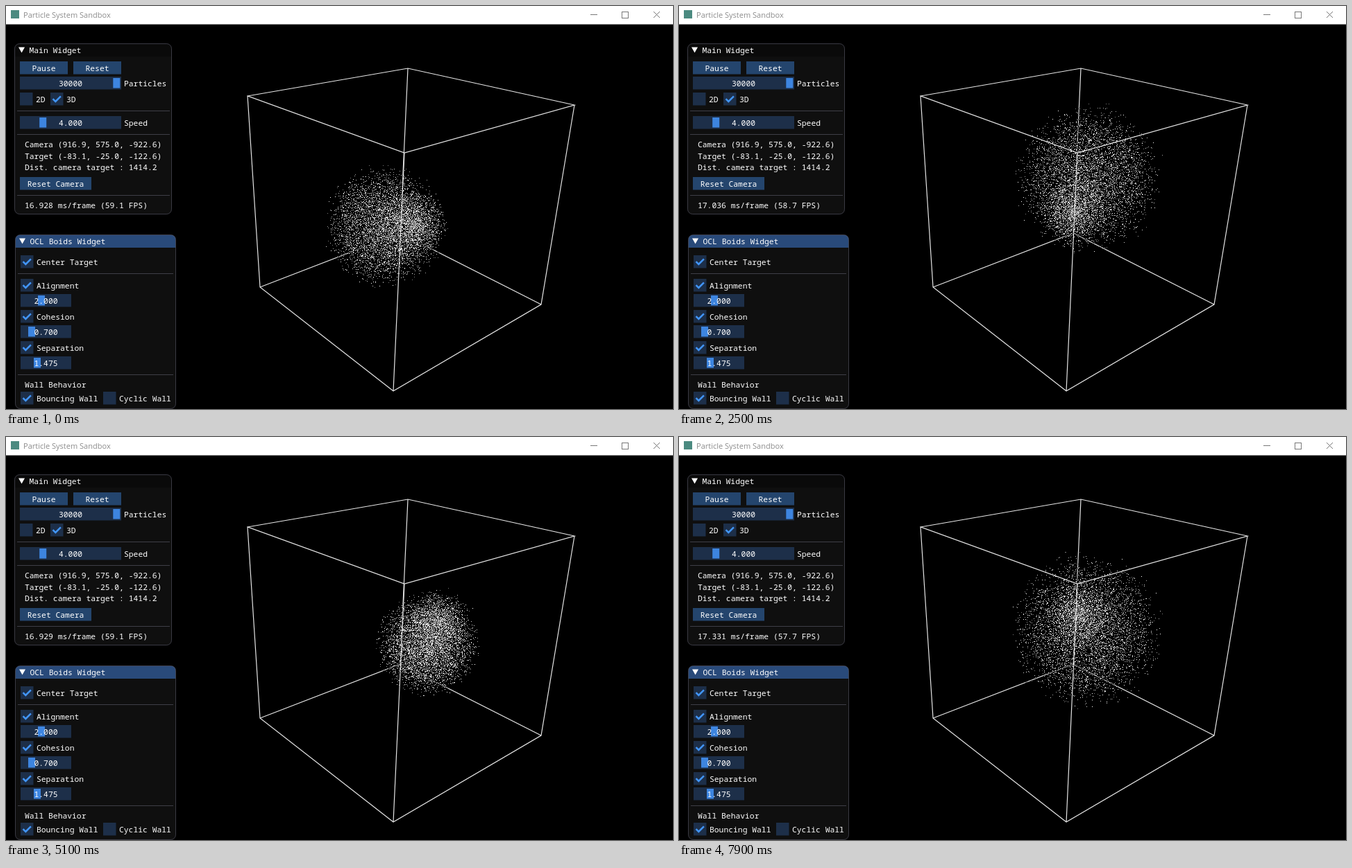
Animation of 961 by 582 pixels, one loop 8000 ms. Source, as an HTML page with a canvas:

```html
<!DOCTYPE html>
<html lang="en">
<head>
<meta charset="utf-8">
<title>Particle System Sandbox</title>
<style>
  html, body { margin: 0; width: 100%; height: 100%; overflow: hidden; background: #000; }
  canvas { display: block; }
</style>
</head>
<body>
<canvas id="stage" width="961" height="582"></canvas>
<script>
const ctx = document.getElementById('stage').getContext('2d');
const LOOP = 8000, STEP = 100, COUNT = 7500, CORE_SIZE = 54;
const MONO = '11.35px "Noto Sans Mono", monospace';
const BUTTON = '#24456d', FRAME = '#1d2f49', GRAB = '#3d85e0', CHECK = '#4296fa';
const EDGE = 'rgba(110,110,128,0.5)', WIRE = '#e6e6e6';
const ROW = 18.5; // height of every control

// turning points of the swarm: seconds, centre, radius
const SWARM = [
  [0, 545, 318, 92], [0.9, 545, 375, 97], [1.8, 575, 272, 84],
  [3, 597, 235, 130], [4.25, 637, 346, 95], [5.2, 606, 298, 78],
  [6.6, 588, 266, 75], [7.5, 600, 277, 140], [8, 585, 279, 116]
];

// turning points of the dense core: seconds, centre
const CORE = [
  [0, 588, 314], [1.5, 555, 300], [3.2, 577, 293], [4.2, 545, 320],
  [5.1, 624, 268], [6.6, 593, 268], [8, 576, 255]
];

// seconds, milliseconds per frame
const LOAD = [
  [0, 16.928], [1.5, 16.962], [3.2, 17.078], [4.2, 16.695],
  [5.1, 16.929], [6.7, 17.849], [7.9, 17.331]
];

// value between two turning points, slowing down at each
function glide(points, t) {
  let i = 0;
  while (i < points.length - 2 && t > points[i + 1][0]) i++;
  const [from, ...a] = points[i], [to, ...b] = points[i + 1];
  const k = (1 - Math.cos(Math.PI * Math.min(1, (t - from) / (to - from)))) / 2;
  return a.map((v, j) => v + (b[j] - v) * k);
}

let seed = 20177;
function rand() {
  seed = (seed * 1664525 + 1013904223) % 4294967296;
  return seed / 4294967296;
}

const boids = Array.from({ length: COUNT }, () => {
  const y = rand() * 2 - 1, turn = rand() * Math.PI * 2, core = rand() < 0.23;
  const r = rand() ** (core ? 0.65 : 0.42) * (0.7 + 0.3 * rand());
  return { y: y * r, ring: Math.sqrt(1 - y * y) * r, turn, spin: 1.2 + rand(), core };
});

function place(t) {
  const swarm = glide(SWARM, t), core = [...glide(CORE, t), CORE_SIZE];
  return boids.map(b => {
    const [x, y, size] = b.core ? core : swarm;
    const side = b.ring * Math.cos(b.turn + b.spin * t);
    return [Math.round(x + side * size), Math.round(y + b.y * size)];
  });
}

const TOP = [[348, 130], [579, 90], [819, 143], [574, 212]];
const BASE = [[366, 406], [568, 328], [771, 431], [558, 556]];

function lines(paths, color, width) {
  ctx.strokeStyle = color;
  ctx.lineWidth = width;
  ctx.beginPath();
  for (const path of paths) {
    path.forEach(([x, y], i) => i ? ctx.lineTo(x, y) : ctx.moveTo(x, y));
  }
  ctx.stroke();
}

function rect(x, y, w, h, color) {
  ctx.fillStyle = color;
  ctx.fillRect(x, y, w, h);
}

function text(str, x, mid, align = 'left') {
  ctx.font = MONO;
  ctx.textAlign = align;
  ctx.fillStyle = '#fff';
  ctx.fillText(str, x, mid + 4);
}

function drawScene(t) {
  rect(0, 0, 961, 582, '#000');
  lines([[BASE[0], BASE[1], BASE[2]], [TOP[1], BASE[1]]], WIRE, 1.2);
  const dots = place(t);
  ctx.fillStyle = 'rgba(0,0,0,0.4)';
  for (const [x, y] of dots) ctx.fillRect(x - 1, y - 1, 3, 3);
  ['#fff', '#d0d0d0', '#a4a4a4', '#787878'].forEach((shade, s, all) => {
    ctx.fillStyle = shade;
    for (let i = s; i < COUNT; i += all.length) ctx.fillRect(...dots[i], 1, 1);
  });
  lines([[...TOP, TOP[0], BASE[0], BASE[3], BASE[2], TOP[2]], [TOP[3], BASE[3]]], WIRE, 1.2);
}

function drawTitleBar() {
  rect(0, 0, 961, 26.5, '#fff');
  rect(7, 6, 12, 12, '#4b8a80');
  ctx.font = '11.03px "Open Sans", sans-serif';
  ctx.textAlign = 'left';
  ctx.fillStyle = '#8c8c8c';
  ctx.fillText('Particle System Sandbox', 25, 17);
  ctx.strokeStyle = '#777';
  ctx.lineWidth = 1;
  ctx.strokeRect(887.5, 8.5, 9, 9);
  lines([[[842, 12.5], [852, 12.5]], [[933, 8], [942, 17]], [[942, 8], [933, 17]]], '#777', 1);
}

function panel(x, y, w, h, title, bar) {
  ctx.beginPath();
  ctx.roundRect(x, y, w, h, 7);
  ctx.fillStyle = '#0f0f0f';
  ctx.fill();
  ctx.save();
  ctx.clip();
  rect(x, y, w, ROW, bar);
  ctx.restore();
  ctx.strokeStyle = EDGE;
  ctx.lineWidth = 1;
  ctx.stroke();
  ctx.fillStyle = '#fff';
  ctx.beginPath();
  ctx.moveTo(x + 5.5, y + 5);
  ctx.lineTo(x + 14.5, y + 5);
  ctx.lineTo(x + 10, y + 13);
  ctx.fill();
  text(title, x + 21, y + 9);
}

function button(x, y, w, label) {
  rect(x, y, w, ROW, BUTTON);
  text(label, x + w / 2, y + 9.5, 'center');
}

function slider(x, y, w, grab, value, label = '') {
  rect(x, y, w, ROW, FRAME);
  rect(grab, y + 2, 10, ROW - 4, GRAB);
  text(value, x + w / 2, y + 9.5, 'center');
  text(label, x + w + 4, y + 9.5);
}

function checkbox(x, y, on, label) {
  rect(x, y, ROW, ROW, FRAME);
  if (on) lines([[[x + 3.5, y + 9.2], [x + 7.3, y + 13], [x + 14.9, y + 5.4]]], CHECK, 2.5);
  text(label, x + 23, y + 9.5);
}

function separator(x, y, w) {
  rect(x, y, w, 1, EDGE);
}

function drawMain(t) {
  const [ms] = glide(LOAD, t);
  panel(12.5, 54.5, 226, 246, 'Main Widget', '#0a0a0a');
  button(20, 80, 69, 'Pause');
  button(97, 80, 69, 'Reset');
  slider(20, 102, 146, 154.3, '30000', 'Particles');
  checkbox(20, 125, false, '2D');
  checkbox(64, 125, true, '3D');
  slider(20, 159, 146, 48.2, '4.000', 'Speed');
  for (const y of [151, 185, 273]) separator(16, y, 220);
  text('Camera (916.9, 575.0, -922.6)', 27, 200);
  text('Target (-83.1, -25.0, -122.6)', 27, 216.5);
  text('Dist. camera target : 1414.2', 27, 233);
  button(20, 247, 103, 'Reset Camera');
  text(`${ms.toFixed(3)} ms/frame (${(1000 / ms).toFixed(1)} FPS)`, 27, 287.5);
}

function drawBoids() {
  panel(13.5, 330.5, 231, 251, 'OCL Boids Widget', '#294a7a');
  checkbox(21, 360, true, 'Center Target');
  const rules = [['Alignment', '2.000', 46], ['Cohesion', '0.700', 32], ['Separation', '1.475', 40]];
  rules.forEach(([label, value, grab], i) => {
    const y = 394 + i * 45;
    checkbox(21, y, true, label);
    slider(21, y + 22, 73, grab, value);
  });
  for (const y of [386, 532]) separator(17, y, 224);
  text('Wall Behavior', 27, 547);
  checkbox(21, 557, true, 'Bouncing Wall');
  checkbox(140, 557, false, 'Cyclic Wall');
}

const start = performance.now();

function tick() {
  const t = Math.floor(((performance.now() - start) % LOOP) / STEP) * STEP / 1000;
  drawScene(t);
  drawTitleBar();
  drawMain(t);
  drawBoids();
  requestAnimationFrame(tick);
}
tick();
</script>
</body>
</html>
```
